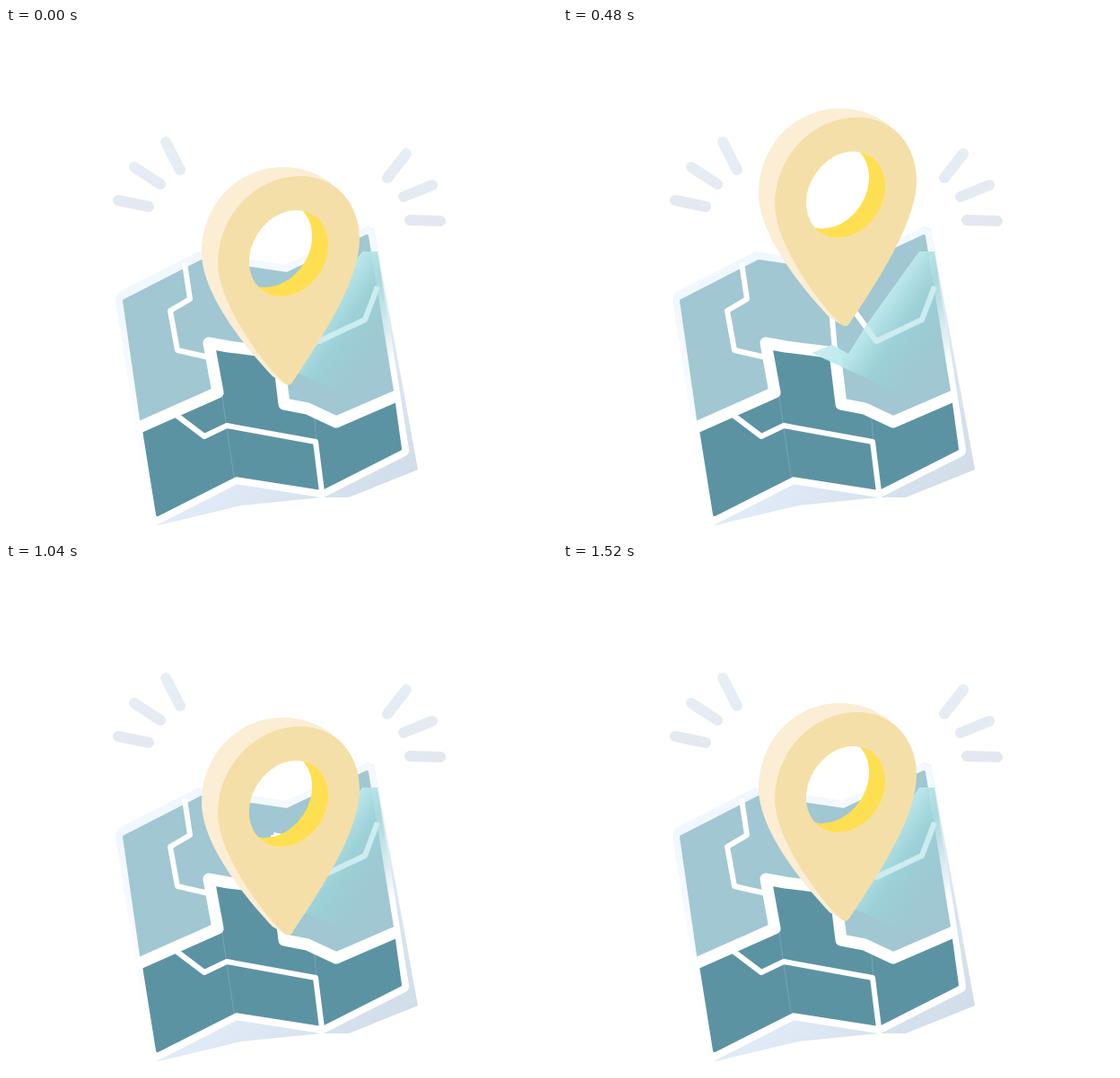
An HTML page that plays this animation: 614 by 566 pixels, repeating every 1560 ms.

```html
<!DOCTYPE html>
<html lang="en">
<head>
<meta charset="utf-8">
<title>Map pin</title>
<style>
  html, body { margin: 0; width: 100%; height: 100%; overflow: hidden; background: #fff; }
  svg { display: block; width: 614px; height: 566px; }
</style>
</head>
<body>
<svg viewBox="0 0 614 566" fill="none" stroke-linejoin="round">
  <defs>
    <linearGradient id="paper" gradientUnits="userSpaceOnUse" x1="150" y1="290" x2="420" y2="540">
      <stop stop-color="#f3f8ff"/>
      <stop offset=".6" stop-color="#dfeaf6"/>
      <stop offset="1" stop-color="#d0dce8"/>
    </linearGradient>
    <linearGradient id="rim" gradientUnits="userSpaceOnUse" x1="150" y1="290" x2="240" y2="480">
      <stop stop-color="#f1f7ff"/>
      <stop offset="1" stop-color="#fff"/>
    </linearGradient>
    <linearGradient id="shade" gradientUnits="userSpaceOnUse" x1="328" y1="286" x2="439" y2="363">
      <stop stop-color="#c8eef2"/>
      <stop offset=".26" stop-color="#bde9ee" stop-opacity=".95"/>
      <stop offset=".5" stop-color="#9bd3d8" stop-opacity=".85"/>
      <stop offset=".82" stop-color="#9bcbd2" stop-opacity=".3"/>
      <stop offset="1" stop-color="#9bcbd2" stop-opacity="0"/>
    </linearGradient>
    <linearGradient id="ray" gradientUnits="userSpaceOnUse" x1="0" y1="120" x2="0" y2="222">
      <stop stop-color="#e6eff6"/>
      <stop offset="1" stop-color="#e3e7f0"/>
    </linearGradient>
    <path id="shadow" d="M277 362L300 353L318 363L340 328L397 249H414L438 400L370 405Z"/>
    <path id="coast" d="M298 302L318 306L349 349L400 325L414 288"/>
    <ellipse id="ring" rx="50.6" ry="41" transform="translate(315 251) rotate(-57)"/>
    <clipPath id="inShadow"><use href="#shadow"/></clipPath>
    <clipPath id="inRing"><use href="#ring"/></clipPath>
    <mask id="hole" maskUnits="userSpaceOnUse" x="200" y="140" width="210" height="270">
      <path fill="#fff" d="M200 140h210v270h-210z"/>
      <g clip-path="url(#inRing)"><use href="#ring" x="-18" y="-10" fill="#000"/></g>
    </mask>
  </defs>

  <path stroke="url(#ray)" stroke-width="12" stroke-linecap="round"
    d="M178 127L194 158M143 155L172 174M125 192L159 199M446 140L425 167M475 175L443 188M450 214L484 215"/>

  <path fill="url(#paper)" d="M122 300L126 294L214 249L313 266L403 221L410 224L459 492L382 523H352L262 532L170 554L164 548Z"/>
  <path stroke="url(#rim)" stroke-width="16" d="M130 303L218 258L313 272L403 230L441 470L352 515L256 500L168 545Z"/>
  <g stroke-width="4">
    <path fill="#a0c7d2" stroke="#a0c7d2" d="M132 304L218 260L313 274L402 232L430 404L368 439L310 420L236 406L152 443Z"/>
    <path fill="#5c93a3" stroke="#5c93a3" d="M154 448L236 406L226 351L300 362L310 419L336 424L368 439L431 411L439 469L352 513L256 498L169 542Z"/>
  </g>
  <path stroke="#fff" stroke-opacity=".16" d="M240 405L254 500M343 425L346 461"/>
  <g stroke="#fff">
    <path stroke-width="6" d="M199 262L205 302L183 315L191 359L226 367M188 430L221 455L246 443L345 461L352 517M298 302L304 370"/>
    <use href="#coast" stroke-width="6"/>
    <path stroke-width="13" d="M146 446L236 406L226 351L248 355L303 362L310 419L336 424L368 439L435 410"/>
  </g>
  <use href="#shadow" fill="url(#shade)"/>
  <g clip-path="url(#inShadow)"><use href="#coast" stroke="#cdecef" stroke-width="6"/></g>

  <g id="pin">
    <g mask="url(#hole)">
      <path fill="#fcedd5" d="M312 397L297 388C275 365 218 300 218 250C218 195 260 155 308 155C330 155 348 162 364 174Z"/>
      <path fill="#f5dfa8" d="M312 397C295 385 236 310 236 262C236 207 280 165 328 165C368 165 394 196 394 235C394 285 345 355 319 395Q316 399 312 397Z"/>
      <use href="#ring" fill="#ffdf52"/>
    </g>
  </g>
</svg>
<script>
  const LOOP = 1560, STEP = 40;
  const linear = p => p, easeIn = p => p * p, easeOut = p => p * (2 - p);

  // [start ms, vertical offset, easing towards the next key]
  const keys = [
    [0, 0, linear], [400, -80, linear], [840, 0, easeOut],
    [1040, 16, easeIn], [1200, -16, linear], [1520, 0, linear], [LOOP, 0]
  ];

  function offsetAt(time) {
    const i = keys.findIndex(key => key[0] > time) - 1;
    const [start, from, ease] = keys[i], [end, to] = keys[i + 1];
    return from + (to - from) * ease((time - start) / (end - start));
  }

  const pin = document.getElementById("pin");

  function draw() {
    const time = Math.floor(performance.now() % LOOP / STEP) * STEP;
    pin.setAttribute("transform", `translate(0 ${offsetAt(time)})`);
    requestAnimationFrame(draw);
  }
  draw();
</script>
</body>
</html>
```
